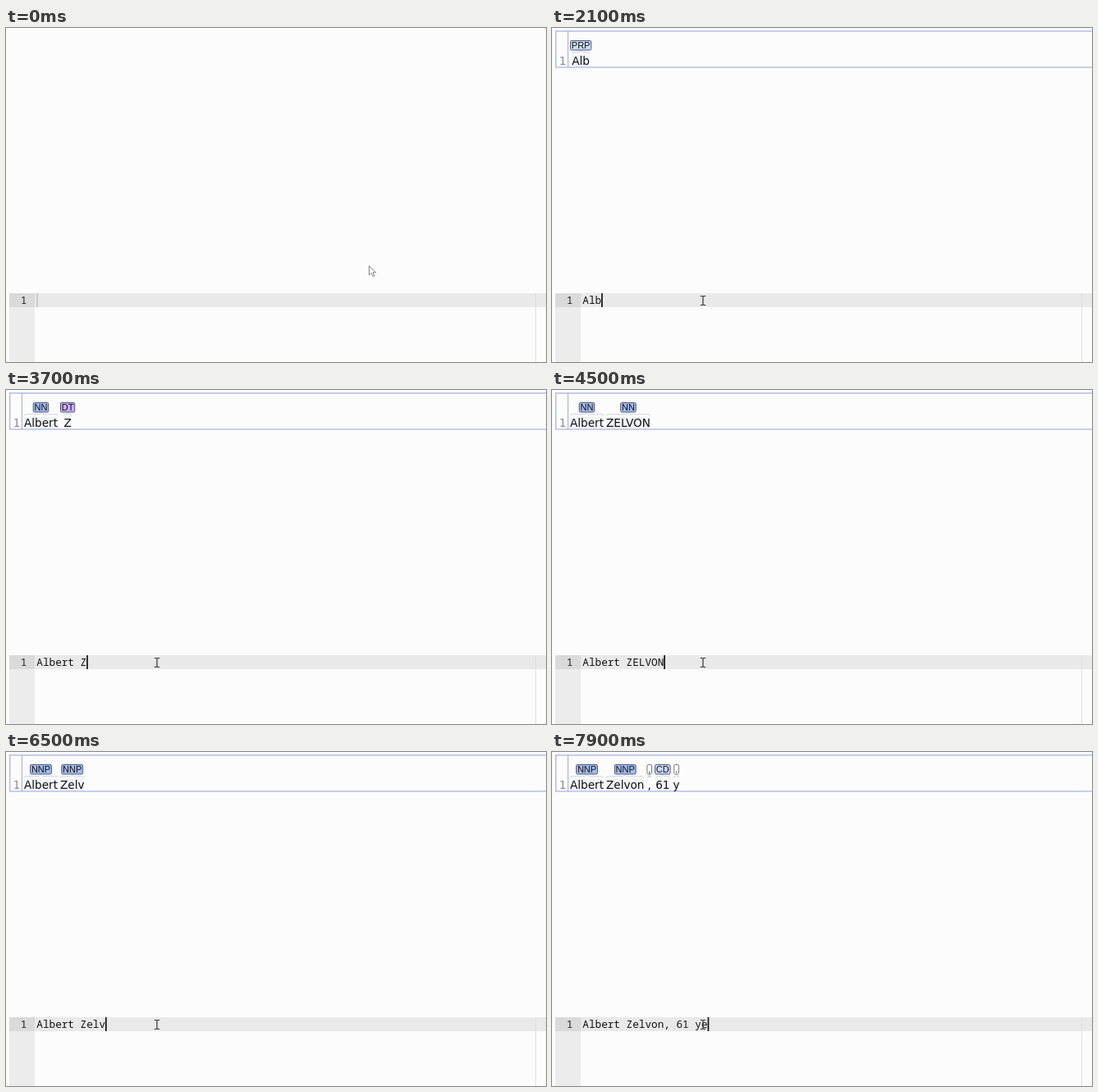
An HTML page with a canvas that plays this animation: 658 by 408 pixels, repeating every 8000 ms.

```html
<!DOCTYPE html>
<html lang="en">
<head>
<meta charset="utf-8">
<title>Live tagging editor</title>
<style>
html, body { margin: 0; width: 100%; height: 100%; overflow: hidden; background: #fcfcfc; }
canvas { display: block; }
</style>
</head>
<body>
<canvas id="stage" width="658" height="408"></canvas>
<script>
const ctx = document.getElementById('stage').getContext('2d');
const LOOP = 8000, STEP = 100;
const CHAR = 7.62;
const MONO = '12.7px "Noto Sans Mono", "DejaVu Sans Mono", monospace';
const WORD = '13.6px "DejaVu Sans", sans-serif';
const TAG = '11px "Liberation Sans", Arial, sans-serif';
const FILL = { NN: '#a4bced', NNP: '#a4bced', PRP: '#ccdaf6', CD: '#ccdaf6', DT: '#ccadf6' };

// start in ms, typed text, parsed words, their tags
const script = [
  [0, '', '', ''],
  [1700, 'A', '', ''],
  [1800, 'A', 'A', 'DT'],
  [2000, 'Al', 'Al', 'PRP'],
  [2100, 'Alb', 'Alb', 'PRP'],
  [2300, 'Albe', 'Albe', 'NN'],
  [2500, 'Alber', 'Alber', 'NN'],
  [2600, 'Albert', 'Albert', 'NN'],
  [3400, 'Albert ', 'Albert', 'NN'],
  [3700, 'Albert Z', 'Albert Z', 'NN DT'],
  [3800, 'Albert ZE', 'Albert ZE', 'NN NN'],
  [4000, 'Albert ZEL', 'Albert ZE', 'NN NN'],
  [4100, 'Albert ZELV', 'Albert ZEL', 'NN NN'],
  [4200, 'Albert ZELVO', 'Albert ZELV', 'NN NN'],
  [4300, 'Albert ZELVO', 'Albert ZELVO', 'NN NN'],
  [4500, 'Albert ZELVON', 'Albert ZELVON', 'NN NN'],
  [4900, 'Albert ZELVO', 'Albert ZELVON', 'NN NN'],
  [5000, 'Albert ZELV', 'Albert ZELVO', 'NN NN'],
  [5100, 'Albert ZEL', 'Albert ZELV', 'NN NN'],
  [5200, 'Albert ZEL', 'Albert ZEL', 'NN NN'],
  [5500, 'Albert ZE', 'Albert ZE', 'NNP NNP'],
  [5600, 'Albert Z', 'Albert Z', 'NN DT'],
  [5800, 'Albert Ze', 'Albert Ze', 'NN NN'],
  [6100, 'Albert Zel', 'Albert Zel', 'NN NN'],
  [6300, 'Albert Zelv', 'Albert Zel', 'NN NN'],
  [6400, 'Albert Zelv', 'Albert Zelv', 'NNP NNP'],
  [6600, 'Albert Zelvo', 'Albert Zelvo', 'NNP NNP'],
  [6700, 'Albert Zelvon', 'Albert Zelvo', 'NNP NNP'],
  [6800, 'Albert Zelvon', 'Albert Zelvon', 'NNP NNP'],
  [7000, 'Albert Zelvon,', 'Albert Zelvon ,', 'NNP NNP ,'],
  [7100, 'Albert Zelvon, ', 'Albert Zelvon ,', 'NNP NNP ,'],
  [7400, 'Albert Zelvon, 6', 'Albert Zelvon , 6', 'NNP NNP , CD'],
  [7500, 'Albert Zelvon, 61', 'Albert Zelvon , 61', 'NNP NNP , CD'],
  [7700, 'Albert Zelvon, 61 ', 'Albert Zelvon , 61', 'NNP NNP , CD'],
  [7800, 'Albert Zelvon, 61 y', 'Albert Zelvon , 61', 'NNP NNP , CD'],
  [7900, 'Albert Zelvon, 61 ye', 'Albert Zelvon , 61 y', 'NNP NNP , CD .']
];

function rect(x, y, w, h, color) {
  ctx.fillStyle = color;
  ctx.fillRect(x, y, w, h);
}

function text(str, x, y, font, color = '#111', align = 'left') {
  ctx.font = font;
  ctx.fillStyle = color;
  ctx.textAlign = align;
  ctx.fillText(str, x, y);
}

function width(str, font) {
  ctx.font = font;
  return ctx.measureText(str).width;
}

function stroke(path, color, lineWidth = 1) {
  ctx.strokeStyle = color;
  ctx.lineWidth = lineWidth;
  ctx.stroke(path);
}

function drawTag(tag, mid, w) {
  const box = new Path2D();
  box.roundRect(mid - w / 2 + 0.5, 15.5, w - 1, 11.5, 1.5);
  ctx.fillStyle = FILL[tag] || '#fff';
  ctx.fill(box);
  stroke(box, FILL[tag] ? '#4c587c' : '#777');
  text(tag, mid, 25.2, TAG, '#111', 'center');
}

function drawBrace(mid, w) {
  const l = mid - w / 2, r = mid + w / 2;
  stroke(new Path2D(`M${l} 31.5Q${l} 29.7 ${l + 3} 29.7H${mid - 2}L${mid} 28L${mid + 2} 29.7H${r - 3}Q${r} 29.7 ${r} 31.5`), '#c3cbdf', 0.8);
}

function drawPanel(words, tags) {
  rect(4, 3, 654, 46, '#fcfcfc');
  rect(4, 3, 654, 1.6, '#b9c0ea');
  rect(4, 47.4, 654, 1.2, '#a9b1e4');
  rect(4, 3, 1.4, 45, '#b0b8e7');
  rect(19, 4, 1, 44, '#a9abc4');
  text('1', 17.5, 45, WORD, '#8c8c8c', 'right');
  let x = 22;
  words.split(' ').forEach((word, i) => {
    const tag = tags.split(' ')[i];
    const wordWidth = width(word, WORD);
    const tagWidth = width(tag, TAG) + 3.6;
    const w = Math.max(wordWidth, tagWidth);
    const mid = x + w / 2;
    if (FILL[tag]) rect(mid - wordWidth / 2, 33, wordWidth, 14, '#f1f3fb');
    drawBrace(mid, wordWidth);
    drawTag(tag, mid, tagWidth);
    text(word, mid, 45, WORD, '#111', 'center');
    x += w + 3;
  });
}

function drawEditor(typed, t) {
  rect(4, 324, 31, 84, '#ececec');
  rect(4, 324, 31, 17, '#dadada');
  rect(35, 324, 623, 17, '#e9e9e9');
  rect(645, 324, 1, 84, '#dedede');
  text('1', 25.4, 337, MONO, '#222', 'right');
  text(typed, 37.3, 337, MONO);
  const caret = 37.2 + typed.length * CHAR;
  if (t < 1200) rect(37.5, 324, 1, 17, '#aaa');
  else if (t < 3200 || t >= 3400) rect(caret, 324, 1.7, 17, '#111');
}

function drawPointer(t) {
  const p = Math.min(1, Math.max(0, (t - 100) / 900));
  const ease = p * p * (3 - 2 * p);
  const x = 442.5 - 258.5 * ease, y = 290.5 + 42.5 * ease;
  ctx.save();
  ctx.translate(x, y);
  if (y < 324) {
    const arrow = new Path2D('M0 0V11.2L2.7 8.8L4.6 13L6.4 12.2L4.6 8.2H8.2Z');
    ctx.fillStyle = '#fff';
    ctx.fill(arrow);
    stroke(arrow, '#666', 0.8);
  } else {
    stroke(new Path2D('M-3.2 -5.5H-1L0 -4.8L1 -5.5H3.2M0 -5V5M-3.2 5.5H-1L0 4.8L1 5.5H3.2'), '#333', 1.2);
  }
  ctx.restore();
}

function frame(now) {
  const t = Math.floor((now % LOOP) / STEP) * STEP;
  const [, typed, words, tags] = script.findLast(row => row[0] <= t);
  rect(0, 0, 658, 408, '#fcfcfc');
  if (words) drawPanel(words, tags);
  drawEditor(typed, t);
  drawPointer(t);
}

const start = performance.now();
function tick() {
  frame(performance.now() - start);
  requestAnimationFrame(tick);
}
tick();
</script>
</body>
</html>
```
